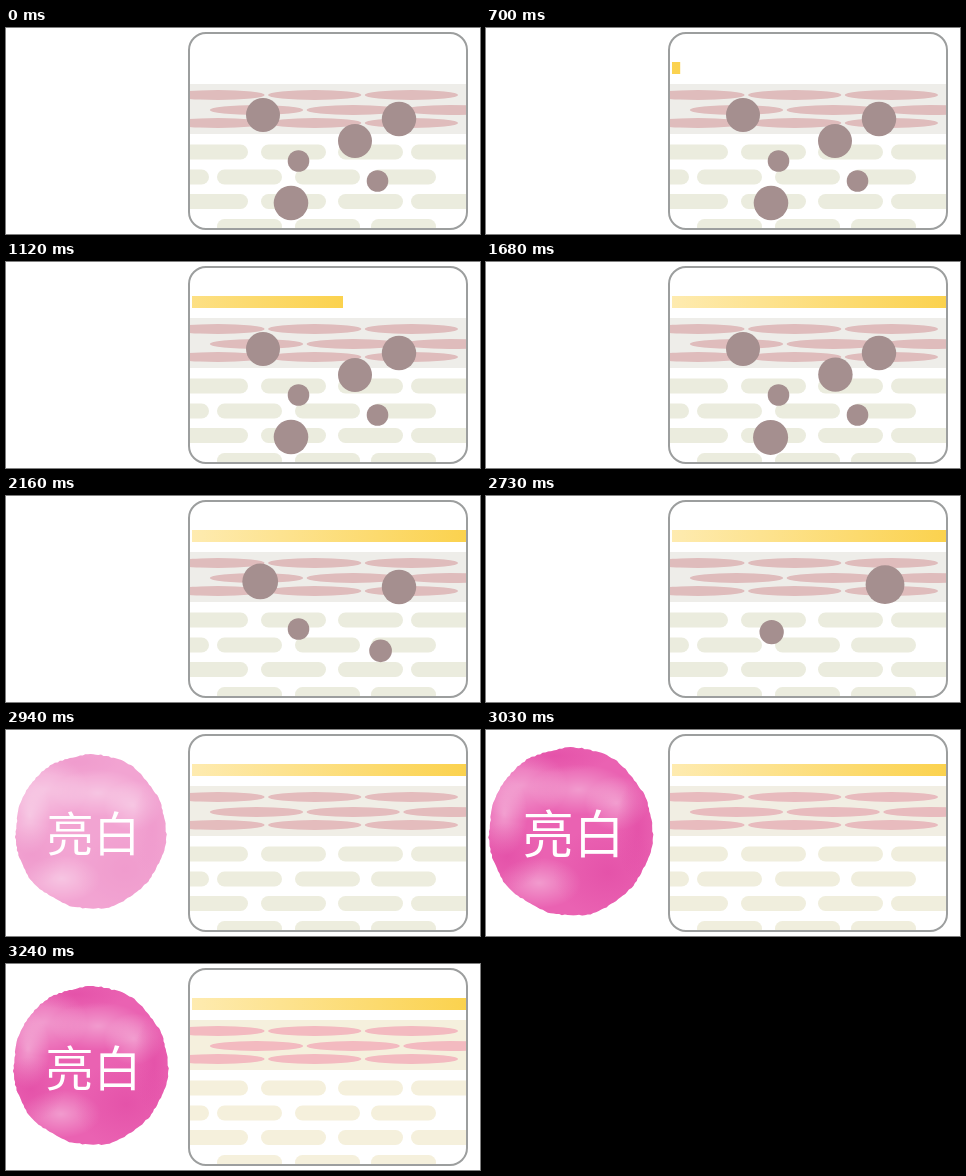
An HTML page for the animation above (5.74 s loop, 474 by 206 pixels).

```html
<!DOCTYPE html>
<html lang="zh-Hant">
<head>
<meta charset="utf-8">
<style>
  html, body { margin: 0; width: 100%; height: 100%; overflow: hidden; background: #fff; }
  svg { display: block; width: 474px; height: 206px; }
  text { font: 500 48px "Noto Sans CJK TC", "Noto Sans CJK SC", "Noto Sans CJK JP", "Noto Sans CJK", sans-serif; }
</style>
</head>
<body>
<svg viewBox="0 0 474 206">
  <defs>
    <clipPath id="panelClip"><rect x="183" y="5" width="278" height="196" rx="17"/></clipPath>
    <clipPath id="barClip"><rect x="186" y="30" width="274" height="20"/></clipPath>
    <clipPath id="stampClip"><path id="stampShape"/></clipPath>
    <linearGradient id="gold">
      <stop offset="0" stop-color="#feebb0"/><stop offset="1" stop-color="#fbd24e"/>
    </linearGradient>
    <radialGradient id="light">
      <stop offset="0" stop-color="#fff" stop-opacity=".36"/><stop offset="1" stop-color="#fff" stop-opacity="0"/>
    </radialGradient>
    <radialGradient id="deep">
      <stop offset="0" stop-color="#dc3c9c" stop-opacity=".4"/><stop offset="1" stop-color="#dc3c9c" stop-opacity="0"/>
    </radialGradient>
  </defs>
  <g clip-path="url(#panelClip)">
    <rect id="band" x="183" y="56" width="278" height="50"/>
    <g id="cells"></g>
    <g id="pills"></g>
    <g clip-path="url(#barClip)"><rect id="bar" y="34" width="274" height="12" fill="url(#gold)"/></g>
    <g id="spots" fill="#a58f8f"></g>
  </g>
  <rect x="183" y="5" width="278" height="196" rx="17" fill="none" stroke="#9c9e9e" stroke-width="2"/>
  <g id="stamp">
    <g id="wash" clip-path="url(#stampClip)"><rect width="170" height="206" fill="#ea62b2"/></g>
    <text x="87.5" y="122" text-anchor="middle" fill="#fff">亮白</text>
  </g>
</svg>
<script>
const LOOP = 5740, STEP = 30;
const byId = id => document.getElementById(id);

function add(parent, tag, attrs) {
  const node = document.createElementNS("http://www.w3.org/2000/svg", tag);
  for (const name in attrs) node.setAttribute(name, attrs[name]);
  return parent.appendChild(node);
}

// Skin layers
[[67, 212], [82, 250.5], [95, 212]].forEach(([cy, first]) => {
  for (let i = 0; i < 3; i++)
    add(byId("cells"), "ellipse", { cx: first + i * 96.7, cy, rx: 46.7, ry: 5 });
});
const evenRow = [177, 255, 332, 405], oddRow = [211, 289, 365];
[[116.5, evenRow], [141.5, [138, ...oddRow]], [166, evenRow], [191, oddRow]].forEach(([y, row]) => {
  for (const x of row) add(byId("pills"), "rect", { x, y, width: 65, height: 15, rx: 7.5 });
});

// Pairs of spots swell about their common centre, one pair after another
const pairs = [
  { start: 1680, center: [317, 144], spots: [[349, 113, 17], [285, 175, 17.3]] },
  { start: 2070, center: [311.5, 117], spots: [[257, 87, 17], [371.5, 153, 10.8]] },
  { start: 2460, center: [346, 109], spots: [[393, 91, 17.2], [292.5, 133, 10.8]] }
];
for (const pair of pairs) {
  pair.node = add(byId("spots"), "g", {});
  for (const [cx, cy, r] of pair.spots) add(pair.node, "circle", { cx, cy, r });
}

// Watercolour stamp: uneven rim and soft washes
let seed = 7;
const random = () => (seed = seed * 16807 % 2147483647) / 2147483647;
const rim = [];
for (let i = 0; i < 180; i++) {
  const a = i * Math.PI / 90;
  const k = 0.99 + 0.007 * Math.sin(5 * a + 1) + 0.006 * Math.sin(11 * a) + 0.014 * (random() - 0.5);
  rim.push((84.5 + 78 * k * Math.cos(a)).toFixed(1) + " " + (101.5 + 80 * k * Math.sin(a)).toFixed(1));
}
byId("stampShape").setAttribute("d", "M" + rim.join("L") + "Z");
[
  ["light", 38, 58, 44, 34], ["light", 22, 85, 22, 40], ["light", 92, 62, 48, 24],
  ["light", 55, 150, 40, 24], ["light", 128, 75, 30, 26], ["deep", 120, 140, 52, 44],
  ["deep", 70, 30, 52, 16], ["deep", 25, 125, 34, 32], ["deep", 148, 100, 20, 50]
].forEach(([paint, cx, cy, rx, ry]) =>
  add(byId("wash"), "ellipse", { cx, cy, rx, ry, fill: `url(#${paint})` }));

const clamp = (v, max) => Math.max(0, Math.min(max, v));
const stepsSince = (t, start) => Math.floor((t - start) / STEP) + 1;
const mix = (from, to, p) => `rgb(${from.map((v, i) => Math.round(v + (to[i] - v) * p))})`;
const scaleAbout = (node, x, y, s) =>
  node.setAttribute("transform", `translate(${x} ${y}) scale(${s}) translate(${-x} ${-y})`);

function render(t) {
  const barStep = clamp(stepsSince(t, 700), 27);
  const barEnd = barStep === 27 ? 460 : 184 + 10.2 * barStep;
  byId("bar").setAttribute("x", barStep ? barEnd - 274 : -200);

  for (const { start, center, node } of pairs) {
    const k = clamp(stepsSince(t, start), 13);
    node.style.display = k < 13 ? "" : "none";
    scaleAbout(node, ...center, 1 + 0.0128 * k);
  }

  const k = clamp(stepsSince(t, 2850), 14);
  byId("stamp").style.opacity = Math.min(1, k / 7);
  scaleAbout(byId("stamp"), 84.5, 101.5, k < 7 ? 0.86 + 0.0286 * k : 1 + 0.06 * (14 - k) / 7);

  const warm = clamp((k - 1) / 13, 1);
  byId("band").setAttribute("fill", mix([238, 237, 233], [245, 240, 221], warm));
  byId("cells").setAttribute("fill", mix([223, 188, 188], [243, 186, 192], warm));
  byId("pills").setAttribute("fill", mix([235, 236, 222], [245, 240, 220], warm));
}

const began = performance.now();
function tick() {
  render((performance.now() - began) % LOOP);
  requestAnimationFrame(tick);
}
tick();
</script>
</body>
</html>
```
